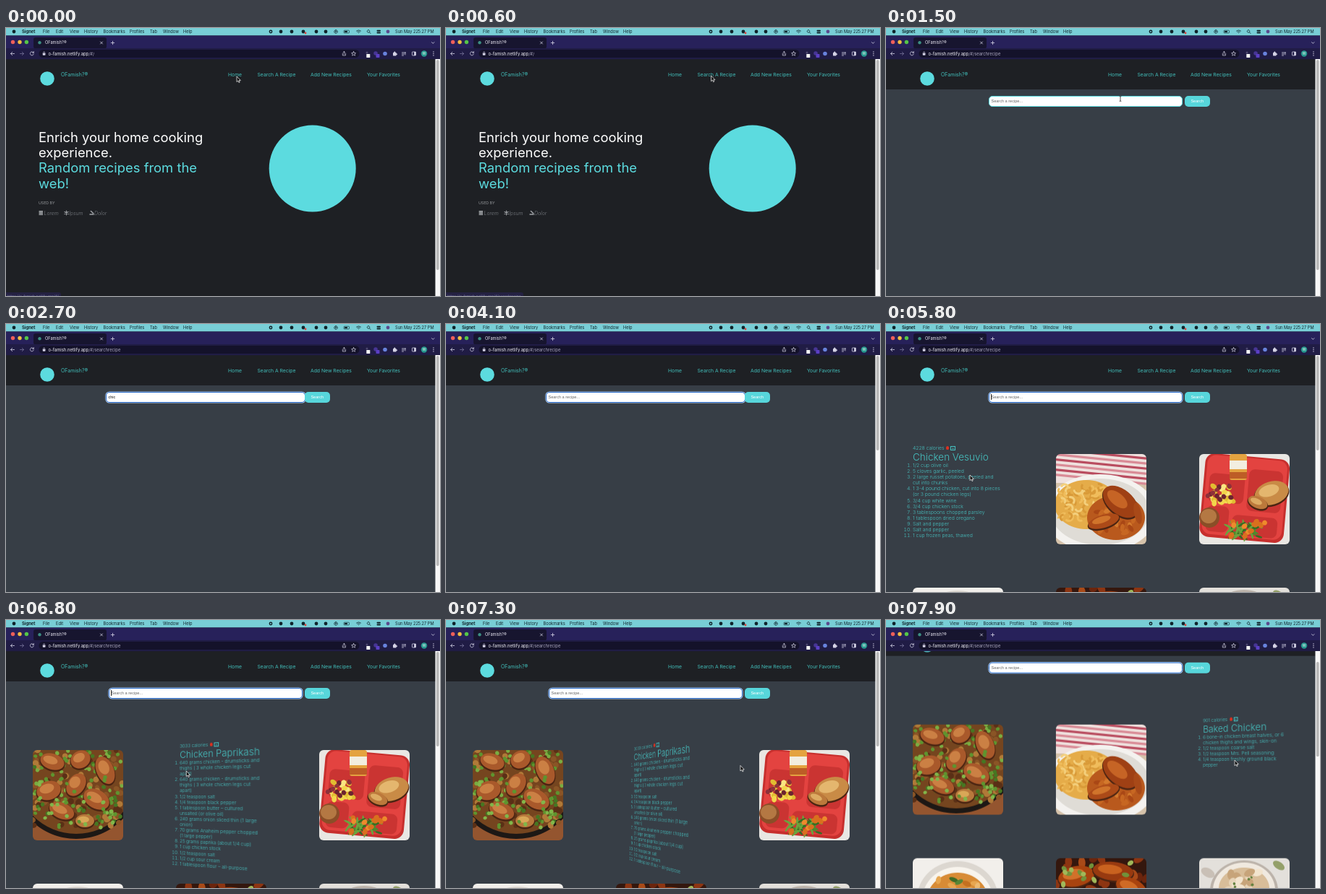
Recreate the animation shown at these times as an HTML page with a canvas. Size 600 px wide and 371 px high, loop 8000 ms.

```html
<!DOCTYPE html>
<html lang="en">
<head>
<meta charset="utf-8">
<title>Recipe search</title>
<style>
  html, body { margin: 0; width: 100%; height: 100%; overflow: hidden; background: #1e2024; }
  #stage { position: absolute; left: 0; top: 0; width: 600px; height: 371px; overflow: hidden; font-family: Inter, sans-serif; }
  #stage svg, #view, #page, #home, #search { position: absolute; left: 0; top: 0; }
  svg { overflow: visible; white-space: pre; }
  #view { top: 43px; width: 593.5px; height: 328px; overflow: hidden; }
  /* Page children use stage coordinates. */
  #page { top: -43px; width: 600px; height: 900px; }
  #search { width: 600px; height: 900px; background: #373e46; }
  .card { position: absolute; width: 125px; height: 125px; transform-style: preserve-3d; }
  .card canvas, .back { position: absolute; left: 0; top: 0; width: 125px; backface-visibility: hidden; }
  .card canvas { height: 125px; border-radius: 6px; }
  .back { height: 125px; transform: rotateY(180deg); color: #45c1c0; font-weight: 300; font-size: 6.8px; white-space: nowrap; }
  .text { position: absolute; top: -13px; left: 0; }
  .text p { margin: 0; height: 9px; line-height: 9px; }
  .text h2 { margin: 0; font-size: 13.5px; line-height: 16px; font-weight: 300; }
  .text ol { margin: 0; padding: 0; line-height: 8.1px; }
  .text i { display: inline-block; width: 4px; height: 5px; margin-left: 3px; border-radius: 60% 60% 50% 50%; background: #e0301e; }
  .text b { display: inline-block; width: 4.4px; height: 4.4px; margin-left: 2px; border: .6px solid; line-height: 4.2px; font-size: 6px; text-align: center; font-weight: 400; vertical-align: .3px; }
  #field { position: absolute; box-sizing: border-box; top: 93.7px; height: 15.6px; border-radius: 5px; background: #fff;
    font: 5.56px/12.6px "Liberation Sans", sans-serif; padding-left: 2.5px; border: 1.5px solid; }
  #button { position: absolute; left: 413px; top: 94px; width: 34.5px; height: 15px; border-radius: 5px; background: #57d6db;
    color: #fff; font: 5.6px/15px "Liberation Sans", sans-serif; text-align: center; }
  #caret { position: absolute; left: 2.4px; top: 2.4px; width: .6px; height: 8px; background: #222; }
  #status { position: absolute; left: 0; top: 365.5px; height: 10px; padding: 0 3px 0 2px; border-radius: 0 3px 0 0;
    background: #26224c; color: #8580c4; font-size: 5px; line-height: 10px; opacity: .75; }
</style>
</head>
<body>
<div id="stage">
  <div id="view"><div id="page">
    <div id="search">
      <div id="field"><span id="query"></span><span id="caret"></span></div>
      <div id="button">Search</div>
    </div>
    <svg id="home" width="600" height="371"></svg>
    <svg id="header" width="600" height="90"></svg>
  </div></div>
  <svg id="frame" width="600" height="371"></svg>
  <div id="status"></div>
  <svg id="cursor" width="10" height="12">
    <path id="arrow" d="M0 0V7.6L1.8 6 3 8.6 4.2 8 3.1 5.6H5.4Z" fill="#111" stroke="#fff" stroke-width=".7"/>
    <path id="beam" d="M-1.3-3.5Q0-3.5 0-2.5Q0-3.5 1.3-3.5M0-2.5V2.5M-1.3 3.5Q0 3.5 0 2.5Q0 3.5 1.3 3.5" fill="none" stroke="#222" stroke-width=".8"/>
  </svg>
</div>
<script>
const $ = id => document.getElementById(id);
const BRAND = 'OFamish?®', HOST = 'o-famish.netlify.app', TEAL = '#42bfbb', CYAN = '#5cdbdf';

// SVG string helpers
const text = (x, y, s, size, fill, more = '') => `<text x="${x}" y="${y}" font-size="${size}" fill="${fill}" ${more}>${s}</text>`;
const rect = (x, y, w, h, fill, r = 0, more = '') => `<rect x="${x}" y="${y}" width="${w}" height="${h}" rx="${r}" fill="${fill}" ${more}/>`;
const dot = (x, y, r, fill) => `<circle cx="${x}" cy="${y}" r="${r}" fill="${fill}"/>`;
const line = (d, color, w = .8) => `<path d="${d}" fill="none" stroke="${color}" stroke-width="${w}" stroke-linecap="round" stroke-linejoin="round"/>`;

function buildFrame() {
  const ink = '#10242b', pale = '#d5d3e6';
  const menu = [[51, 'File'], [69, 'Edit'], [88, 'View'], [108, 'History'], [134.5, 'Bookmarks'], [171, 'Profiles'],
    [199, 'Tab'], [217, 'Window'], [245, 'Help'], [538, 'Sun May 22'], [569.5, '5:27 PM']];
  return rect(0, 0, 600, 10.5, '#78ced6') + dot(11, 5, 2.4, ink) +
    text(22, 7.2, 'Signet', 5.9, ink, 'font-weight="700"') +
    menu.map(([x, s]) => text(x, 7.2, s, 5.7, ink)).join('') +
    [366, 380, 395, 411, 429, 442].map(x => dot(x, 5, 2.4, ink)).join('') +
    dot(414, 7, 1.4, '#d8433c') + dot(366, 5, 1, '#78ced6') +
    line('M456 2.6a2.4 2.4 0 1 0 .1 0M455.3 4v2l1.8-1z', ink, .7) +
    rect(467, 3.2, 7.5, 3.8, 'none', 1, `stroke="${ink}" stroke-width=".6"`) + rect(468, 4.1, 4, 2, ink) +
    line('M484.5 4q3-2.4 6 0M485.8 5.4q1.7-1.3 3.4 0M487.5 6.8v.1', ink) +
    line('M501 2.7a1.8 1.8 0 1 0 .1 0M502.5 6l1.5 1.6', ink) +
    rect(512.5, 2.7, 5.5, 2, ink, 1) + rect(512.5, 5.4, 5.5, 2, ink, 1) + dot(528, 5, 2.4, '#5b4a8c') +
    rect(0, 10.5, 600, 18, '#27215a') + rect(38, 13, 101, 15.5, '#17152f', 3) +
    dot(9.5, 19.5, 2.7, '#f0605a') + dot(19, 19.5, 2.7, '#f4bd3f') + dot(28.4, 19.5, 2.7, '#55c548') +
    dot(46.5, 20.3, 2.2, '#3c8f83') + text(54, 22.4, BRAND, 5.6, '#eceaf5') +
    line('M130.5 19l3 3m0-3l-3 3M145.3 20.5h4.4M147.5 18.3v4.4M588.5 19.7l1.8 1.6 1.8-1.6', pale) +
    rect(0, 28, 600, 15.2, '#201c45') + rect(45.5, 30, 443, 11, '#14122a', 5.5) +
    line('M11.5 35.5h-5m2.2-2.2l-2.2 2.2 2.2 2.2M38 34a2.5 2.5 0 1 0 .3 2M38.3 32.6V34.3H36.6', pale) +
    line('M19.5 35.5h5m-2.2-2.2l2.2 2.2-2.2 2.2', '#77739a') +
    rect(50.8, 34.8, 3.6, 3, pale, .5) + line('M51.6 34.8v-1a1 1 0 0 1 2 0v1', pale, .6) +
    `<text x="58.5" y="37.6" font-size="5.9" fill="#f2f1f8">${HOST}<tspan id="path" fill="#a9a6be"></tspan></text>` +
    line('M465.3 35v3h4.2v-3M467.4 36.4v-4m-1.2 1.2l1.2-1.2 1.2 1.2', pale, .7) +
    line('M480.6 32.5l.9 2 2.1.2-1.6 1.4.5 2.1-1.9-1.1-1.9 1.1.5-2.1-1.6-1.4 2.1-.2z', pale, .7) +
    rect(498.3, 36, 5, 5, '#f5f5f5', .6) + dot(499, 34, 1.5, '#4d4870') +
    dot(511, 35, 2.8, '#473594') + rect(511.5, 36, 5, 5, '#5b3fc4', .8) +
    dot(524, 35.5, 2.8, '#6883dd') + rect(535, 34, 4.6, 4.4, pale, .6) + dot(537.3, 33.7, 1.1, pale) + dot(540, 36.2, 1, pale) +
    line('M547.5 34h5M547.5 36h3M547.5 38h2M552 34v3', pale, .8) +
    rect(561.5, 33, 5, 5, 'none', .5, `stroke="${pale}" stroke-width=".8"`) + rect(564.2, 33, 2.3, 5, pale) +
    dot(578, 35.5, 4.2, '#27998f') + text(578, 37.3, 'W', 4.8, '#fff', 'text-anchor="middle"') +
    [33, 35.5, 38].map(y => dot(591, y, .7, pale)).join('') +
    rect(593.5, 43, 6.5, 328, '#f7f7f7') + rect(594.9, 44, 3.8, 0, '#b8b8b8', 1.9, 'id="thumb"');
}

function buildHeader() {
  const links = [[307, 'Home'], [347.5, 'Search A Recipe'], [421, 'Add New Recipes'], [499, 'Your Favorites']];
  return rect(0, 43, 594, 42, '#1e2024') + dot(57, 70, 9.8, CYAN) + text(76, 66.7, BRAND, 7, TEAL) +
    links.map(([x, s]) => text(x, 66.7, s, 6.8, TEAL)).join('');
}

function buildHome() {
  const big = (y, s, c) => text(45, y, s, 18.4, c);
  const gray = '#777b80', used = (x, s) => text(x, 259, s, 6.9, gray, 'font-style="italic" font-weight="300"');
  return rect(0, 43, 600, 328, '#1e2024') + big(158, 'Enrich your home cooking', '#fff') + big(179.2, 'experience.', '#fff') +
    big(200.4, 'Random recipes from the', CYAN) + big(221.6, 'web!', CYAN) + text(45, 244.5, 'USED BY', 5.2, '#9a9da1') +
    [253, 255.2, 257.4].map(y => rect(45.5, y, 5.5, 1.7, '#a0a3a7', .3)).join('') +
    line('M83.5 253.2v5.6M81 254.6l5 2.8M86 254.6l-5 2.8', '#a0a3a7', 1.2) +
    line('M116 258h5M117.4 253.5l3.2 3', '#a0a3a7', 1.5) +
    used(52.5, 'Lorem') + used(87, 'Ipsum') + used(122, 'Dolor') + dot(423.7, 194.5, 60, CYAN);
}

$('frame').innerHTML = buildFrame();
$('header').innerHTML = buildHeader();
$('home').innerHTML = buildHome();

// Food pictures: flat blobs on a 125 x 125 canvas
let seed = 7;
const rnd = (a = 0, b = 1) => (seed = seed * 16807 % 2147483647, a + (b - a) * seed / 2147483647);
const pick = list => list[Math.floor(rnd(0, list.length))];

function painter(g) {
  const blob = (x, y, rx, ry, c, turn = 0) => {
    g.fillStyle = c; g.beginPath(); g.ellipse(x, y, rx, ry, turn, 0, 7); g.fill();
  };
  const box = (x, y, w, h, c, r = 0) => { g.fillStyle = c; g.beginPath(); g.roundRect(x, y, w, h, r); g.fill(); };
  const scatter = (n, x, y, w, h, r, colors, flat = 1) => {
    while (n--) blob(x + rnd(0, w), y + rnd(0, h), r * rnd(.8, 1.2), r * flat, pick(colors), rnd(0, 3));
  };
  const meat = (x, y, rx, ry, turn, c = '#a9592b', hi = '#cb8044') => {
    blob(x, y + 1.5, rx + 1, ry + 1, '#4b2412', turn); blob(x, y, rx, ry, c, turn);
    blob(x - rx * .15, y - ry * .2, rx * .6, ry * .5, hi, turn);
  };
  return { g, blob, box, scatter, meat };
}

const foods = [
  ({ blob, box, scatter, meat }) => {
    box(0, 0, 125, 125, '#94552f');
    blob(60, 34, 89, 89, '#1d1815'); blob(60, 32, 84, 84, '#75451f');
    scatter(90, 0, 0, 125, 105, 4, ['#8a5526', '#5a3016', '#b07a38']);
    scatter(120, 0, 0, 125, 104, 2.7, ['#5f942f', '#79ad42', '#467722']);
    meat(27, 16, 17, 11, .3); meat(66, 13, 14, 12, -.5); meat(100, 28, 12, 20, -.4);
    meat(22, 56, 17, 13, -.3); meat(60, 48, 12, 17, .6); meat(88, 68, 19, 13, .5);
    meat(40, 84, 18, 11, .4); meat(72, 98, 13, 9, 0, '#b8793c', '#d9a757');
    scatter(32, 5, 30, 110, 78, 2.7, ['#5f942f', '#82b64a']);
  },
  ({ g, blob, box, scatter, meat }) => {
    box(0, 0, 125, 125, '#d5c2aa'); box(0, 0, 125, 40, '#efe1de');
    g.save(); g.rotate(.1);
    for (let y = -8; y < 34; y += 7) box(0, y, 140, 3.2, y % 2 ? '#d98b96' : '#b94c5f');
    g.restore();
    blob(61, 82, 78, 54, '#f4f2ef'); blob(61, 80, 68, 46, '#dfdcd6');
    blob(42, 70, 44, 34, '#e5ac49');
    g.lineWidth = 3;
    for (let i = 0; i < 55; i++) {
      g.strokeStyle = pick(['#f3cf7c', '#d99a38', '#f0bd5c']);
      const x = rnd(5, 66), y = rnd(45, 96), a = rnd(0, 6);
      g.beginPath(); g.arc(x, y, rnd(3, 6), a, a + 3); g.stroke();
    }
    blob(83, 88, 40, 31, '#b9591d'); scatter(30, 52, 72, 62, 38, 5, ['#c76722', '#a94715', '#d47a2d'], .6);
    meat(89, 66, 28, 17, .7, '#9f4014', '#c66425'); meat(66, 93, 22, 9, -.3, '#ac4a18', '#d0742b');
    blob(113, 82, 5, 15, '#a84918', -.2);
  },
  ({ g, blob, box, scatter, meat }) => {
    box(0, 0, 125, 125, '#e9e7e3');
    g.save(); g.translate(62, 63); g.rotate(.09);
    box(-58, -60, 117, 116, '#c72f2d', 13); box(-55, -58, 111, 110, '#e34340', 12);
    [[-50, -33, 49, 40], [4, -43, 47, 58], [-50, 12, 31, 36], [-14, 22, 63, 28]].forEach(b => box(...b, '#ca3432', 8));
    g.restore();
    box(42, 0, 24, 36, '#e4a340', 3); box(42, 9, 24, 12, '#f2eee0'); box(42, 25, 24, 9, '#bd5d26');
    scatter(22, 16, 43, 31, 25, 4.3, ['#f2d64b', '#fae681', '#e1bc32'], .8);
    scatter(10, 12, 42, 38, 26, 3.2, ['#6d2430', '#8e303a']);
    meat(100, 54, 24, 16, -.3, '#c98b46', '#e4b66e'); meat(81, 67, 14, 8, .4, '#bc793b', '#ddab63');
    blob(14, 88, 14, 14, '#8a4e27'); blob(13, 86, 11, 10, '#b47843');
    scatter(48, 39, 96, 46, 19, 6, ['#4d8b2f', '#6ba33d', '#356d23'], .25);
    scatter(12, 42, 93, 50, 24, 4.3, ['#ee8a2c', '#d9701e'], .8);
  },
  ({ blob, box, scatter }) => {
    box(0, 0, 125, 125, '#f2efeb'); blob(62, 56, 56, 52, '#dcd7d0'); blob(62, 58, 49, 46, '#f8f4ed');
    blob(62, 60, 43, 40, '#d88b35'); scatter(25, 30, 28, 65, 50, 6, ['#e7a650', '#c4701f', '#edba72'], .6);
    blob(57, 30, 7, 3, '#3e6b26', .4); blob(64, 33, 6, 3, '#558636', -.5);
  },
  ({ box, scatter, meat }) => {
    box(0, 0, 125, 125, '#34170e'); scatter(55, 0, 0, 125, 125, 7, ['#8d3512', '#6b250d', '#a94a18'], .7);
    meat(28, 25, 25, 14, -.2, '#a8430f', '#d2712a'); meat(79, 18, 28, 13, .1, '#983a10', '#c9621f');
    meat(104, 41, 22, 13, .4, '#a8430f', '#cf6a25'); meat(55, 55, 26, 14, .1, '#a8430f', '#cf6a25');
    scatter(12, 4, 3, 110, 44, 4.5, ['#71923b', '#a1b95a'], .7);
  },
  ({ blob, box, scatter }) => {
    box(0, 0, 125, 125, '#e3e0db'); blob(62, 45, 47, 42, '#bcb3aa'); blob(62, 44, 43, 38, '#f0e9df');
    blob(62, 42, 35, 29, '#d8bd99'); scatter(18, 38, 20, 46, 32, 7, ['#e7d4b8', '#c7a47a', '#f2e4ce'], .7);
    scatter(8, 45, 26, 35, 20, 1.8, ['#62803d']); blob(12, 20, 10, 6, '#c9c0b6', .5); blob(110, 10, 9, 5, '#94a069', .6);
  }
];

const recipes = [
  ['4228', 'Chicken Vesuvio', ['1/2 cup olive oil', '5 cloves garlic, peeled', '2 large russet potatoes, peeled and|cut into chunks',
    '1 3-4 pound chicken, cut into 8 pieces|(or 3 pound chicken legs)', '3/4 cup white wine', '3/4 cup chicken stock',
    '3 tablespoons chopped parsley', '1 tablespoon dried oregano', 'Salt and pepper', 'Salt and pepper', '1 cup frozen peas, thawed']],
  ['3033', 'Chicken Paprikash', [...Array(2).fill('640 grams chicken - drumsticks and|thighs ( 3 whole chicken legs cut|apart)'),
    '1/2 teaspoon salt', '1/4 teaspoon black pepper', '1 tablespoon butter – cultured|unsalted (or olive oil)',
    '240 grams onion sliced thin (1 large|onion)', '70 grams Anaheim pepper chopped|(1 large pepper)',
    '25 grams paprika (about 1/4 cup)', '1 cup chicken stock', '1/2 teaspoon salt', '1/2 cup sour cream',
    '1 tablespoon flour – all-purpose']],
  ['901', 'Baked Chicken', ['6 bone-in chicken breast halves, or 6|chicken thighs and wings, skin-on', '1/2 teaspoon coarse salt',
    '1/2 teaspoon Mrs. Pell seasoning', '1/4 teaspoon freshly ground black|pepper']]
];

const cards = foods.map((draw, i) => {
  const card = document.createElement('div'), pic = document.createElement('canvas');
  card.className = 'card';
  card.style.left = 36.5 + i % 3 * 198 + 'px';
  card.style.top = (i < 3 ? 179.7 : 364.5) + 'px';
  pic.width = pic.height = 250;
  const g = pic.getContext('2d');
  g.scale(2, 2);
  draw(painter(g));
  if (recipes[i]) {
    const [kcal, name, items] = recipes[i];
    card.innerHTML = `<div class="back"><div class="text"><p>${kcal} calories<i></i><b>+</b></p><h2>${name}</h2><ol>` +
      items.map(s => `<li>${s.replace(/\|/g, '<br>')}</li>`).join('') + '</ol></div></div>';
  }
  card.append(pic);
  $('search').append(card);
  return card;
});

// Timeline
const clamp = x => Math.min(1, Math.max(0, x));
// Same curve as the CSS keyword "ease"
function ease(x) {
  let lo = 0, hi = 1, u;
  for (let i = 0; i < 20; i++) {
    u = (lo + hi) / 2;
    const v = 1 - u;
    if (.75 * u * v * v + .75 * u * u * v + u ** 3 < x) lo = u; else hi = u;
  }
  return .3 * u * (1 - u) ** 2 + 3 * u * u * (1 - u) + u ** 3;
}
const ramp = (t, start, length) => ease(clamp((t - start) / length));

const hovers = [[4990, 5980], [6295, 7150], [7395, 9000]];
const route = [[0, 319, 67], [200, 320, 67], [700, 372, 66], [1000, 372, 67], [1400, 324, 96], [1500, 324, 98], [4300, 324, 98],
  [5000, 121, 203], [5200, 117, 208], [5800, 116, 209], [5850, 116, 209], [6300, 238, 209], [6700, 249, 209],
  [7000, 250, 209], [7400, 436, 200], [7700, 482, 194], [8000, 482, 194]];

function pointer(t) {
  const i = route.findIndex(p => p[0] > t), [a, x, y] = route[i - 1], [b, x2, y2] = route[i];
  const k = (t - a) / (b - a), s = k * k * (3 - 2 * k);
  return [x + (x2 - x) * s, y + (y2 - y) * s];
}
const show = (el, on) => el.style.display = on ? '' : 'none';

function render(t) {
  const onSearch = t >= 1000, focus = t >= 1800, listed = t >= 3700;
  const scroll = 35.3 * ramp(t, 7500, 350);
  $('page').style.transform = `translateY(${-scroll}px)`;
  show($('home'), !onSearch);
  $('path').textContent = onSearch ? '/#/searchrecipe' : '/#/';
  $('thumb').setAttribute('height', listed ? 131 : 291);
  $('thumb').setAttribute('y', 44 + scroll * .4);

  show($('status'), t < 200 || t >= 500 && t < 1100);
  $('status').textContent = `https://${HOST}/#/${t < 500 ? '' : 'searchrecipe'}`;

  const grow = 4 * (ramp(t, 1500, 300) - ramp(t, 4300, 300)), field = $('field');
  field.style.left = 142 - grow + 'px';
  field.style.width = 267.5 + 2 * grow + 'px';
  field.style.borderColor = focus ? '#2367c9' : CYAN;
  field.style.boxShadow = focus ? '0 0 0 .6px #c5dcf5' : 'none';
  const typed = t < 3300 ? 'chicken'.slice(0, Math.max(0, Math.floor((t - 2070) / 130))) : '';
  $('query').textContent = typed || 'Search a recipe...';
  $('query').style.color = typed ? '#111' : '#666';
  show($('caret'), focus && !typed && t % 1000 >= 400 && t % 1000 < 900);

  cards.forEach((card, i) => {
    show(card, t >= 4400);
    if (!hovers[i]) return;
    const [on, off] = hovers[i], turn = 180 * (ramp(t, on, 800) - ramp(t, off, 800));
    card.style.transform = `perspective(417px) rotateY(${turn}deg)`;
  });

  const [x, y] = pointer(t), beam = t >= 1400 && t < 4400;
  show($('cursor'), t < 2000 || t >= 4300);
  show($('arrow'), !beam);
  show($('beam'), beam);
  $('cursor').style.transform = `translate(${x}px,${y}px)`;
}

function tick() {
  render(Math.floor(performance.now() % 8000 / 100) * 100);
  requestAnimationFrame(tick);
}
tick();
</script>
</body>
</html>
```
